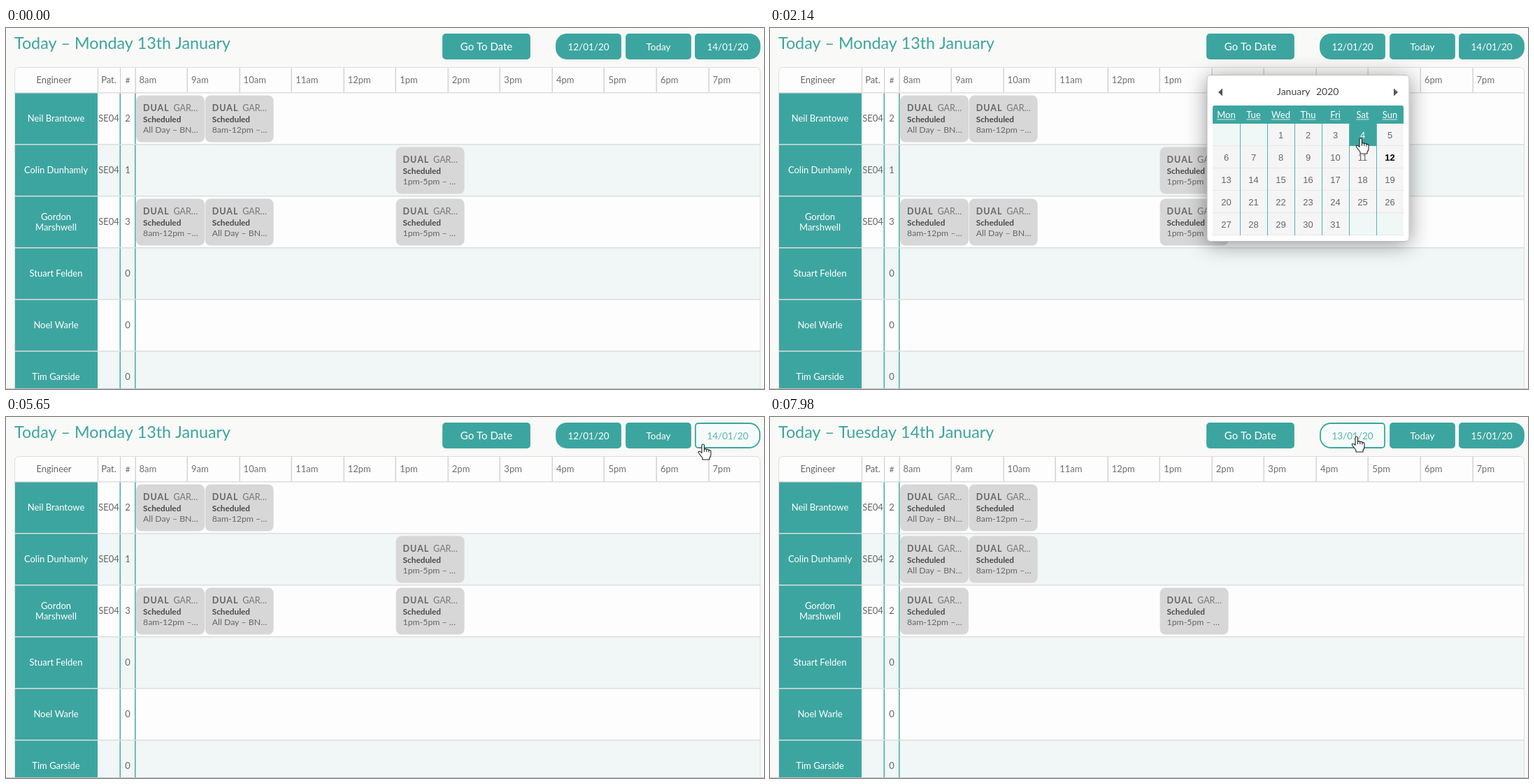
Animation of 1084x517 px, one loop 8 s. Source, as an HTML page with a canvas:

```html
<!DOCTYPE html>
<html lang="en">
<head>
<meta charset="utf-8">
<title>Engineer schedule</title>
<style>
html, body { margin: 0; width: 100%; height: 100%; overflow: hidden; background: #f9f9f7; }
canvas { display: block; }
</style>
</head>
<body>
<canvas id="stage" width="1084" height="517"></canvas>
<script>
const ctx = document.getElementById('stage').getContext('2d');
const LOOP = 8000;
const TEAL = [61, 165, 160], WHITE = [255, 255, 255], PALE = [244, 251, 250], SOFT_TEAL = [92, 178, 173];
const rgb = c => `rgb(${c.map(Math.round)})`;
const teal = rgb(TEAL);
const mix = (a, b, k) => a.map((v, i) => v + (b[i] - v) * k);
const clamp = v => Math.max(0, Math.min(1, v));
const smooth = k => k * k * (3 - 2 * k);
const within = (t, a, b) => t >= a && t < b;

const BURSTS = [
  [120, 880, 11], [940, 940, 1], [1360, 2140, 11], [2220, 2310, 2], [2450, 2840, 6],
  [2990, 3080, 2], [3540, 4000, 7], [4230, 4230, 1], [4710, 5500, 11], [5570, 5650, 2],
  [6810, 7610, 11], [7670, 7760, 2], [7900, 7980, 2]
];
function snap(t) {
  let shown = 0;
  for (const [a, b, n] of BURSTS) {
    if (t < a) break;
    const step = n > 1 ? (b - a) / (n - 1) : 1;
    shown = a + Math.min(n - 1, Math.floor((t - a + 6) / step)) * step;
  }
  return shown;
}

// Pointer path: [time, x, y]
const PATH = [
  [60, 985, 535], [740, 680, 21], [1290, 680, 21], [2140, 846, 158], [2310, 846, 183],
  [2380, 846, 183], [2840, 642, 222], [3470, 642, 222], [4000, 777, 156],
  [4640, 777, 156], [5500, 998, 39], [6740, 998, 39], [7200, 984, 37], [7440, 840, 28]
];
function pointerAt(t) {
  const i = PATH.findIndex(p => p[0] > t);
  if (i < 0) return PATH[PATH.length - 1].slice(1);
  const [t0, x0, y0] = PATH[Math.max(0, i - 1)], [t1, x1, y1] = PATH[i];
  const k = smooth(clamp((t - t0) / (t1 - t0 || 1)));
  return [x0 + (x1 - x0) * k, y0 + (y1 - y0) * k];
}
const CLICKS = [[800, 880], [2990, 3080], [5570, 5650], [7900, 7980]];
const isBusy = t => within(t, 880, 940) || within(t, 2990, 4230);

const FADE = 300;
const fade = k => 1 - (1 - clamp(k)) ** 2.2;
function hoverLevel(t, [enter, leave]) {
  const up = fade((Math.min(t, leave) - enter) / FADE);
  return t > leave ? up * (1 - smooth(clamp((t - leave) / FADE))) : up;
}

function text(s, x, y, size, color, { align = 'left', weight = 400, family = 'Lato, sans-serif', spacing = 0 } = {}) {
  ctx.font = `${weight} ${size}px ${family}`;
  ctx.letterSpacing = spacing + 'px';
  ctx.textAlign = align;
  ctx.fillStyle = color;
  ctx.fillText(s, x, y);
}
function rect(x, y, w, h, color) {
  ctx.fillStyle = color;
  ctx.fillRect(x, y, w, h);
}
function rounded(x, y, w, h, r, fill, stroke, line = 1) {
  ctx.beginPath();
  ctx.roundRect(x, y, w, h, r);
  if (fill) { ctx.fillStyle = fill; ctx.fill(); }
  if (stroke) { ctx.strokeStyle = stroke; ctx.lineWidth = line; ctx.stroke(); }
}

const BUTTONS = [
  { x: 624, w: 126, r: 4, size: 15, hover: [665, 1480] },
  { x: 786, w: 94, r: [15, 4, 4, 15], size: 13.5, hover: [7440, 9000] },
  { x: 886, w: 94, r: 4, size: 13.5, hover: [7200, 7400] },
  { x: 985, w: 94, r: [4, 15, 15, 4], size: 13.5, hover: [5340, 7200] }
];
function drawButton(b, label, t) {
  const k = hoverLevel(t, b.hover);
  rounded(b.x + 1, 9, b.w - 2, 35, b.r, rgb(mix(TEAL, PALE, k)), teal, 1.8);
  text(label, b.x + b.w / 2, 32, b.size, rgb(mix(WHITE, SOFT_TEAL, k)), { align: 'center' });
}

const ROW_TOP = 93, ROW = 74, HOUR_X = 185, HOUR = 74.55;
const STAFF = [['Neil Brantowe'], ['Colin Dunhamly'], ['Gordon', 'Marshwell'], ['Stuart Felden'], ['Noel Warle'], ['Tim Garside']];
const HOURS = ['8am', '9am', '10am', '11am', '12pm', '1pm', '2pm', '3pm', '4pm', '5pm', '6pm', '7pm'];
const SLOTS = [186, 284.7, 557.6];
const ALL_DAY = 'All Day – BN…', MORNING = '8am-12pm –…', AFTERNOON = '1pm-5pm – …';
// Jobs per row: [slot, note]
const MONDAY = {
  title: 'Today – Monday 13th January', nav: ['12/01/20', 'Today', '14/01/20'],
  rows: [[[0, ALL_DAY], [1, MORNING]], [[2, AFTERNOON]], [[0, MORNING], [1, ALL_DAY], [2, AFTERNOON]], [], [], []]
};
const TUESDAY = {
  title: 'Today – Tuesday 14th January', nav: ['13/01/20', 'Today', '15/01/20'],
  rows: [[[0, ALL_DAY], [1, MORNING]], [[0, ALL_DAY], [1, MORNING]], [[0, MORNING], [2, AFTERNOON]], [], [], []]
};

function drawCard(x, y, note, lit) {
  rounded(x, y, 98, 67, 8, lit ? '#e0e0e0' : '#d7d7d7');
  text('DUAL', x + 10, y + 22.5, 12.5, '#666', { weight: 700, spacing: 1 });
  text('GAR…', x + 53.5, y + 22.5, 12.5, '#777');
  text('Scheduled', x + 10, y + 38, 11.8, '#4a4a4a', { weight: 700 });
  text(note, x + 10, y + 53, 12.3, '#666');
}

function drawTable(day, t) {
  rounded(12.5, 56.5, 1066, 500, [6, 6, 0, 0], '#fdfdfd', '#ddd');
  const center = { align: 'center' };
  text('Engineer', 68.5, 79, 13, '#666', center);
  text('Pat.', 147, 79, 13, '#666', center);
  text('#', 174, 79, 11.5, '#666', center);
  for (const x of [131, 163]) rect(x, 57, 1, 36, '#ccc');
  HOURS.forEach((h, i) => {
    const x = HOUR_X + i * HOUR;
    rect(Math.floor(x) - 0.5, 57, 1.5, 36, '#d4d4d4');
    text(h, x + 5.5, 79, 13, '#707070');
  });
  STAFF.forEach((name, i) => {
    const y = ROW_TOP + i * ROW, jobs = day.rows[i];
    rect(13, y, 1065, ROW, i % 2 ? '#f1f6f6' : '#fdfdfd');
    rect(13, y, 118, ROW, teal);
    for (const x of [162.5, 184]) rect(x, y, 1.6, ROW, '#4db0a9');
    rect(13, y - 1, 1065, 1.5, '#dedede');
    name.forEach((part, n) =>
      text(part, 71.5, y + 41 + (n - (name.length - 1) / 2) * 15, 13, '#fff', center));
    if (i < 3) text('SE04', 147, y + 41, 13, '#666', center);
    text(jobs.length, 174, y + 41, 13, '#666', center);
    for (const [slot, note] of jobs) {
      const lit = i === 1 && slot === 2 && within(t, 3540, 3660);
      drawCard(SLOTS[slot], y + 3.5, note, lit);
    }
  });
  rect(0, 516, 1084, 1, '#c4c4c4');
}

const CAL = { x: 633, y: 137, w: 39, h: 32 };
const inCalendar = (x, y) => within(x, CAL.x, CAL.x + 7 * CAL.w) && within(y, CAL.y, CAL.y + 5 * CAL.h);
function dayUnder(x, y) {
  if (!inCalendar(x, y)) return 0;
  const d = Math.floor((y - CAL.y) / CAL.h) * 7 + Math.floor((x - CAL.x) / CAL.w) - 1;
  return d >= 1 && d <= 31 ? d : 0;
}
function triangle(x, y, dx) {
  ctx.beginPath();
  ctx.moveTo(x, y);
  ctx.lineTo(x + dx, y - 5.5);
  ctx.lineTo(x + dx, y + 5.5);
  ctx.fillStyle = '#555';
  ctx.fill();
}
function drawCalendar(t, active) {
  ctx.save();
  ctx.shadowColor = 'rgba(0,0,0,.42)';
  ctx.shadowBlur = 30;
  ctx.shadowOffsetY = 4;
  rounded(625, 67, 289.5, 239, 5, '#fff');
  ctx.restore();
  rounded(625, 67.5, 289, 238, 5, '#fff', '#bbb');
  triangle(641, 92, 6);
  triangle(898, 92, -6);
  text('January', 725, 96, 14, '#444');
  text('2020', 781, 96, 14, '#444');
  rounded(CAL.x, 111, 273, 26, [3, 3, 0, 0], teal);
  ['Mon', 'Tue', 'Wed', 'Thu', 'Fri', 'Sat', 'Sun'].forEach((name, i) => {
    const mid = CAL.x + (i + 0.5) * CAL.w;
    text(name, mid, 129, 13, '#fff', { align: 'center' });
    const w = ctx.measureText(name).width;
    rect(mid - w / 2, 130.5, w, 1, '#d8eeec');
  });
  for (let i = 0; i < 35; i++) {
    const d = i - 1, col = i % 7;
    const x = CAL.x + col * CAL.w, y = CAL.y + Math.floor(i / 7) * CAL.h;
    const real = d >= 1 && d <= 31, on = real && d === active;
    rect(x, y, CAL.w, CAL.h, on ? teal : real ? '#f5f5f5' : '#eff8f7');
    rect(x, y + CAL.h - 1, CAL.w, 1, on ? teal : '#e6e8e8');
    if (col) rect(x, y, 1, CAL.h, '#52b5ae');
    if (!real) continue;
    const bold = d === 12 || (d === 13 && t >= 2990);
    text(d, x + CAL.w / 2, y + 20.5, 13, on ? '#fff' : d === 12 ? '#000' : '#666',
      { align: 'center', weight: bold ? 700 : 400, family: '"Liberation Sans", Arial, sans-serif' });
  }
}

const ARROW = new Path2D('M0 0V16.5L4 13L6.6 19L9.2 18L6.7 12.2H12Z');
const HAND = new Path2D('M-3 1.5Q-3 0-1.3 0Q.5 0 .5 1.5V7Q2.5 6 4 7.5Q6 6.8 7 8.5Q10 8 10 10.5V15Q10 17.5 8 19.5V22H-2V19.5L-7 13Q-8.5 11-6.8 10.3Q-5.2 9.8-3 12.5Z');
const KNUCKLES = new Path2D('M.5 7V11M3.8 7.5V11M7 8.5V11.5');
function drawPointer(x, y, hand, clicked) {
  if (clicked) {
    ctx.beginPath();
    ctx.arc(x, y, 13, 0, 7);
    ctx.fillStyle = 'rgba(243,236,20,.58)';
    ctx.fill();
  }
  ctx.save();
  ctx.translate(x, y);
  ctx.fillStyle = '#fff';
  ctx.strokeStyle = '#222';
  ctx.lineWidth = 1.1;
  ctx.lineJoin = 'round';
  const shape = hand ? HAND : ARROW;
  ctx.fill(shape);
  ctx.stroke(shape);
  if (hand) ctx.stroke(KNUCKLES);
  ctx.restore();
}

function draw(time) {
  const t = snap(time % LOOP);
  const day = t >= 7600 ? TUESDAY : MONDAY;
  const busy = isBusy(t), open = within(t, 880, 3080);
  const [px, py] = pointerAt(t);
  const active = t >= 2990 ? 13 : dayUnder(px, py);

  rect(0, 0, 1084, 517, '#f9f9f7');
  text(day.title, 12, 30, 23.3, teal);
  const labels = [busy ? 'Loading...' : 'Go To Date', ...day.nav];
  BUTTONS.forEach((b, i) => drawButton(b, labels[i], t));
  drawTable(day, t);
  if (open) drawCalendar(t, active);
  if (t >= 120) {
    const onButton = within(py, 8, 45) && BUTTONS.some(b => within(px, b.x, b.x + b.w));
    const hand = !busy && (onButton || (open && active > 0));
    drawPointer(px, py, hand, CLICKS.some(c => within(t, ...c)));
  }
}

const start = performance.now();
function tick() {
  draw(performance.now() - start);
  requestAnimationFrame(tick);
}
tick();
</script>
</body>
</html>
```
